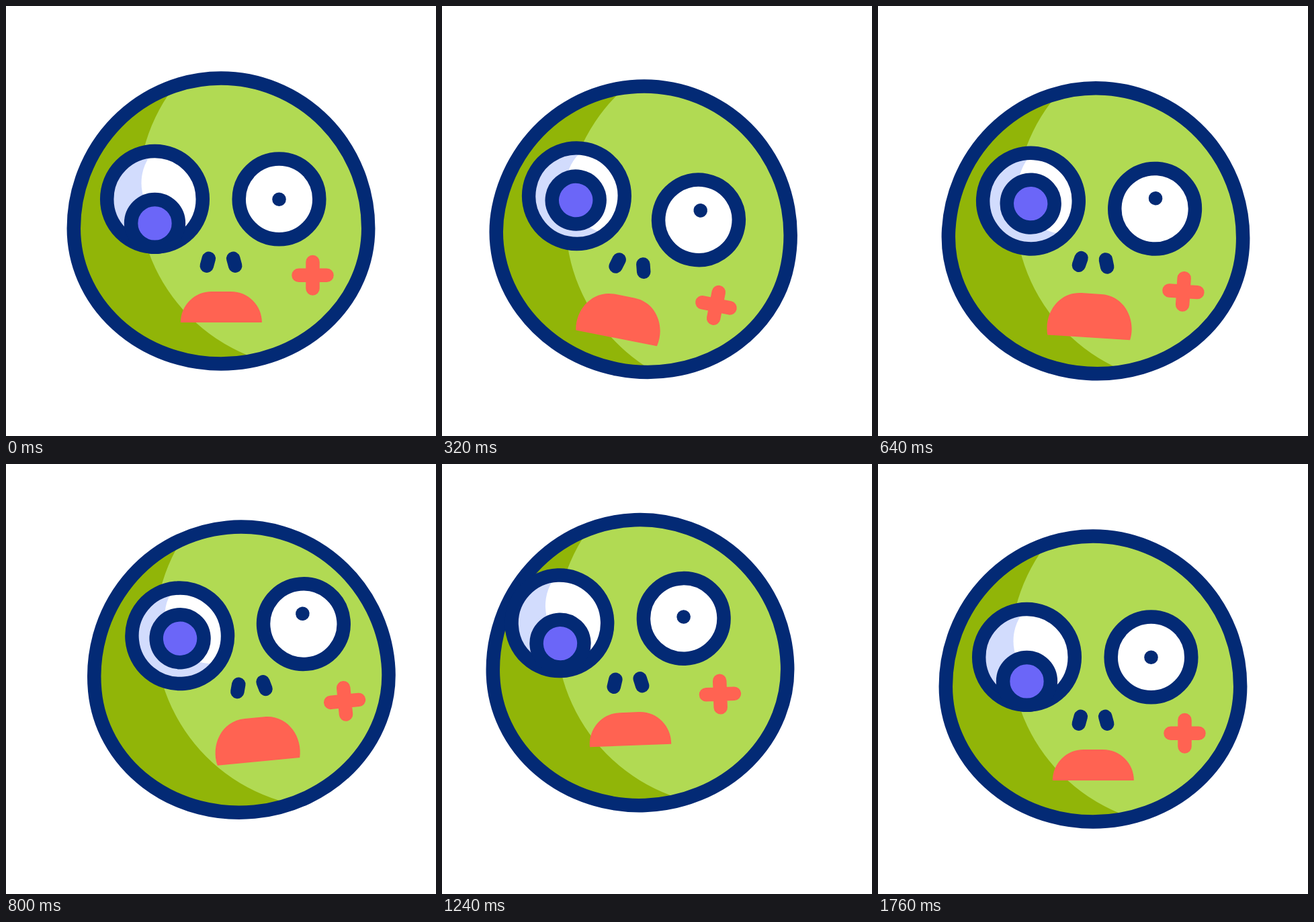
These frames come from a looping animation (640 by 640 pixels, 3000 ms). An HTML page:

```html
<!DOCTYPE html>
<html lang="en">
<head>
<meta charset="utf-8">
<title>Dizzy zombie face</title>
<style>
  html, body { margin: 0; height: 100%; overflow: hidden; background: #fff; }
  svg { display: block; width: 100%; height: 100%; }
  .ink, .scar { fill: none; stroke: #032a75; stroke-width: 20.5; stroke-linecap: round; }
  .scar { stroke: #ff6352; }
</style>
</head>
<body>
<!-- All coordinates are relative to the centre of the stage. -->
<svg viewBox="-320 -320 640 640">
  <defs>
    <!-- The skull is widest a little below its middle. -->
    <path id="skull" d="M-219.2 11A219.2 223.5 0 0 1 219.2 11A219.2 201.5 0 0 1 -219.2 11Z"/>
    <clipPath id="skin"><use href="#skull"/></clipPath>
    <clipPath id="ball"><circle r="71.3"/></clipPath>
  </defs>

  <g id="head">
    <use href="#skull" fill="#91b508"/>
    <circle cx="138" cy="-42" r="261" fill="#b1da53" clip-path="url(#skin)"/>
    <use href="#skull" class="ink"/>
  </g>

  <g id="face">
    <g transform="translate(-98.5 -32.6)">
      <circle r="71.3" fill="#d2dcfd"/>
      <g clip-path="url(#ball)"><circle cx="50" cy="-24" r="70" fill="#fff"/></g>
      <circle class="ink" r="71.3"/>
      <circle id="bigPupil" class="ink" r="35.4" style="fill:#6b66f8"/>
    </g>
    <g transform="translate(86.5 -32.6)">
      <circle class="ink" r="59.8" style="fill:#fff"/>
      <circle id="smallPupil" r="10.3" fill="#032a75"/>
    </g>
    <path id="nose" class="ink" d="M-18.2 55.8L-21.2 66.7M18.2 55.8L21.2 66.7"/>
    <path id="scar" class="scar" d="M115.5 80.7H157.5M136.5 61V100.5"/>
    <path id="mouth" fill="#ff6352"/>
  </g>
</svg>
<script>
const LOOP = 3000, STEP = 40;

// Moments at which each kind of movement turns round.
const SIDEWAYS = [100, 460, 790, 1240, 1600];
const UPRIGHT = [180, 490, 1000, 1050, 1560];
const TILT = [0, 400, 960, 1360];
const GAPE = [0, 385, 970, 1340];

const el = id => document.getElementById(id);
const mix = (a, b, k) => a + (b - a) * k;
const smooth = x => {
  x = Math.min(1, Math.max(0, x));
  return x * x * (3 - 2 * x);
};

// Starts at 0 and eases to one level after another.
const swing = (t, times, ...levels) => levels.reduce((value, level, i) =>
  mix(value, level, smooth((t - times[i]) / (times[i + 1] - times[i]))), 0);

function mouthPath(open) {
  const corner = mix(60.5, 61.5, open), base = mix(151, 164.8, open);
  const sideX = mix(60.5, 69, open), sideY = base - mix(25.4, 30, open);
  const topX = mix(39.9, 50, open), top = base - mix(46, 65.5, open);
  return `M${-corner} ${base}C${-sideX} ${sideY} ${-topX} ${top} -14.5 ${top}` +
    `H14.5C${topX} ${top} ${sideX} ${sideY} ${corner} ${base}Z`;
}

function place(id, x, y, tilt = 0) {
  el(id).setAttribute("transform", `translate(${x} ${y}) rotate(${tilt})`);
}

function draw(t) {
  const tilt = swing(t, TILT, 12.4, -9.9, 0);
  const open = swing(t, GAPE, 1, 1, 0);

  // The face slides further than the head, which gives it depth.
  place("head", swing(t, SIDEWAYS, -28, 29.5, -25.4, 0),
    swing(t, UPRIGHT, 28, -35.5, -35.5, 0), tilt);
  place("face", swing(t, SIDEWAYS, -44, 40, -45.5, 0),
    swing(t, UPRIGHT, 32, -79, -79, 0), tilt);

  place("bigPupil", 0, mix(36, 4, open));
  place("smallPupil", 0, mix(0.4, -15.5, open));
  place("nose", 0, -8.3 * open);
  place("scar", 0, 6.8 * open);
  place("mouth", 0.4, 0);
  el("mouth").setAttribute("d", mouthPath(open));
}

const start = performance.now();
function tick() {
  const t = (performance.now() - start) % LOOP;
  draw(Math.floor(t / STEP) * STEP);
  requestAnimationFrame(tick);
}
tick();
</script>
</body>
</html>
```
